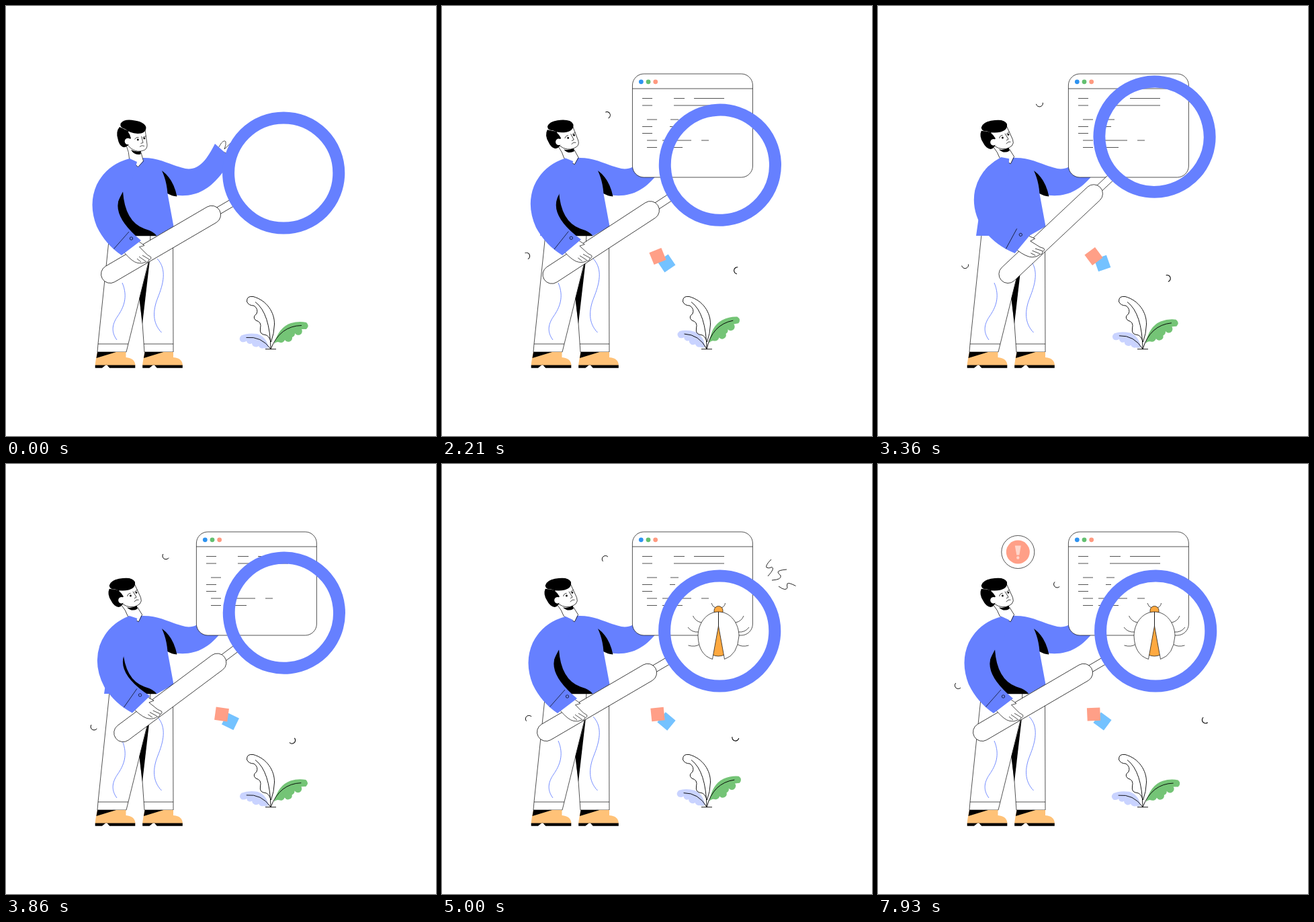
Animation, 640 px wide and 640 px high, one loop 8 s. Source, as an HTML page:

```html
<!DOCTYPE html>
<html lang="en">
<head>
<meta charset="utf-8">
<title>Bug search</title>
<style>
  html, body { margin: 0; width: 100%; height: 100%; overflow: hidden; background: #fff; }
  svg { display: block; width: 100vw; height: 100vh; }
  .o { fill: #fff; stroke: #000; }
  .l { fill: none; stroke: #000; }
  .w { fill: none; stroke: #6680ff; }
  .b { fill: #6680ff; }
  .t { fill: #ffc278; }
</style>
</head>
<body>
<svg viewBox="0 0 640 640" stroke-width=".68" stroke-linejoin="round">
  <defs>
    <g id="shoe">
      <path class="t" d="M136 515H178.500V523Q192 524 192.500 535H132.700Q133 529 136 515Z"/>
      <path d="M136 515H164L134.500 524ZM132.700 534.500H192.300V538.800H154L149.500 533.500 143 538.800H132.700Z"/>
      <path fill="#fff" d="M149.500 534L154.500 539.500H143.500Z"/>
    </g>
  </defs>

  <!-- plant -->
  <g id="blueLeaf">
    <path fill="#c9d3ff" d="M391 508Q387 492 374 488Q360 486 350 490.500Q345 496 350.500 500Q356 501 358 498.500A5 5 0 0 0 366 502A6 6 0 0 0 376 506A6 6 0 0 0 384 509Q388 511 391 508Z"/>
    <path class="l" stroke-width=".9" d="M357.500 493.500Q380 491 394 510.500"/>
  </g>
  <g id="greenLeaf">
    <path fill="#74c476" d="M399 503Q406 478 424 472Q436 468.500 447 471Q452.500 476 447 481L440 481A5.500 5.500 0 0 1 430 487A6 6 0 0 1 426 493A6 6 0 0 1 415 497A6 6 0 0 1 407 500.500Q402 499 399 503Z"/>
    <path class="l" stroke-width=".9" d="M394 510.500Q408 476 440 475.500"/>
  </g>
  <path class="o" stroke-width=".9" d="M368 432.500C388 438 400 456 399.500 474Q399 488 394.500 500Q391 490 386 489.500Q377 489 378.500 480Q381 470 372 468Q366 463 373 458Q376 451 369 446Q361 446 358.500 440Q358 431 368 432.500Z"/>
  <path class="l" stroke-width=".9" d="M371 440.500Q393 457 394 510.500M386 510.700H402"/>

  <!-- legs -->
  <path class="o" d="M154 340L137 503 136 515H179L213 378 225 340Z"/>
  <path class="o" d="M215 340L213 378 199 434 203 472 206 515H249L248.500 340Z"/>
  <path d="M214 376L198.500 436 203 473 214 378Z"/>
  <path class="l" d="M137 503H182M205 503H249"/>
  <path class="w" stroke-width=".9" d="M173 412C182 433 175 449 166 462S157 486 165 497M225 376C240 392 234 414 226 434S218 472 231.500 486"/>
  <use href="#shoe"/><use href="#shoe" x="70.500"/>

  <!-- torso and far arm -->
  <path class="o" d="M315 213L320.500 204Q325 199 327 202Q328 206 325 213L334 204.500V222Z"/>
  <path class="b" d="M181 228.500Q195 224 205 226C230 226 247 238 267 242C287 245 298 230 311 205L330 222V238C308 268 287 290 240.500 279.500L249.500 328V342H146L149 321 160 243Q170 233 181 228.500Z"/>
  <path d="M232 245Q249 257 254.500 283.500Q247 283 240.500 279Q239 260 232 245Z"/>
  <path d="M174 276Q177 321 206 331.500Q220 335.500 224.500 342.300H190Q158 318 167 290Z"/>
  <path fill="#fff" d="M249.800 328L224.500 342.300H250Z"/>

  <g id="head">
    <path fill="#fff" d="M179.500 209L184 228 196.500 239.500 204.500 230 201 216 188 200Z"/>
    <path class="l" d="M179.500 209Q183 217 183.500 227L196.500 239.500 204.500 231 201 218"/>
    <path d="M186 214Q193 218 201 215.500L200.500 220.500Q191 223 186 214Z"/>
    <path class="o" d="M182 184H207L210 206Q210.500 212 206 214.500Q196 219 186 212L180 206Z"/>
    <path d="M169 180Q163 187 166.500 198Q168 207 174 210Q179 211 183 206L181 200 186 197 184 191Q181 187 182 186Z"/>
    <path d="M170.500 175Q175 168.500 187 169.800Q207 172 208.500 181Q208 190 196 190Q184 189 177 183Q169 181 170.500 175Z"/>
    <circle cx="181.500" cy="201.500" r="4.800" fill="#fff"/>
    <circle cx="196.300" cy="199" r="1.450"/><circle cx="205.800" cy="197" r="1.450"/>
    <path class="l" d="M191.500 198.500Q193.500 194.500 197.500 195.500M203.500 195.500L208.500 193.500M201.500 194L204 203.500 200.500 204.500M199 209.500Q202 206.500 206 208.500"/>
  </g>

  <!-- browser window -->
  <g id="win">
    <rect class="o" x="283.400" y="101" width="179" height="154" rx="17"/>
    <path class="l" d="M283.400 123H462.400"/>
    <circle cx="296.300" cy="112.800" r="3.400" fill="#2e93f0"/>
    <circle cx="307" cy="112.800" r="3.400" fill="#63c070"/>
    <circle cx="317.700" cy="112.800" r="3.400" fill="#ff9a80"/>
    <path id="code" class="l" d="M298 137.500h15m32 0h16m14 0h45M298 148h15m32 0h75M305 169h15m20 0h12M298 179.500h15m26 0h8M298 189.500h15M305 200h15m8 0h43m15 0h11M305 210.500h15m8 0h30"/>
  </g>

  <!-- floating bits -->
  <rect id="sky" x="-9.700" y="-9.700" width="19.400" height="19.400" fill="#74c2ff"/>
  <rect id="coral" x="-9.700" y="-9.700" width="19.400" height="19.400" fill="#ff9f87"/>
  <g class="l" stroke-width=".9">
    <path id="arcTop" d="M.5 -5A5 5 0 0 1 .5 5"/>
    <path id="arcLeft" d="M.5 -5A5 5 0 0 1 .5 5"/>
    <path id="arcRight" stroke-width="1.100" d="M.5 -5A5 5 0 0 1 .5 5"/>
  </g>
  <g id="zaps" class="l" stroke-width=".85">
    <path pathLength="1" d="M490 142Q481 151 483 154Q486 156 491 153.500Q496 155 485 167"/>
    <path pathLength="1" d="M513 157Q500 158 500 161Q501 164 504 166Q506 172 491 173"/>
    <path pathLength="1" d="M526.500 181.500Q516 176 514 178Q513 181 514 184Q512 190 501 182"/>
  </g>
  <g id="badge">
    <circle class="o" r="24.500"/>
    <circle r="17.500" fill="#ff9f87"/>
    <g id="mark" fill="#fff"><path d="M-4.500 -9.500H4.500L2 4.500H-2Z"/><circle cy="8.500" r="2.200"/></g>
  </g>

  <g id="bug">
    <path class="l" d="M407 214Q402 212 401 207M416 214Q421 212 421.500 207M386 236Q377 234 373.500 226M382 250Q372 251 366 243M384 268Q377 273 366.500 270M437 236Q446 234 449 226M441 250Q451 251 457 243M439 268Q446 273 456.500 270"/>
    <path fill="#ffa940" stroke="#000" d="M405 221V218A6.500 6.500 0 0 1 418 218V221Z"/>
    <path fill="#ffa940" stroke="#000" d="M411.500 238L402.500 284Q411 288 420.500 284Z"/>
    <path class="o" d="M411.500 220C393 220 381 238 381 256Q382 284 402.500 290.500L411.500 241ZM411.500 220C430 220 442 238 442 256Q440 284 420.500 290.500L411.500 241Z"/>
  </g>

  <!-- near arm holding the glass -->
  <g id="arm">
    <g transform="translate(155 399) rotate(-30.300)">
      <rect class="o" x="180" y="-5.500" width="32" height="11"/>
      <rect class="o" x="-13.500" y="-13.500" width="202" height="27" rx="13.500"/>
    </g>
    <circle cx="413.200" cy="248.500" r="82.100" fill="none" stroke="#6680ff" stroke-width="18"/>
    <path class="o" d="M176 367Q188 381 196 382.500Q203 384 208 381Q212 382 212.500 378Q217 377 215.500 373.500Q210 371 206 366L198.500 358.500 206 356.500 193 347Z"/>
    <path class="l" d="M195 376L201 381M198 373L208 380M203 371L213 377"/>
    <path class="b" d="M184 227Q150 236 135 266Q122 295 135 328Q148 355 172 371L201 349 193 342Q158 310 169 285L174 276 186 265 195 232Z"/>
    <path class="l" d="M160.500 361.500L183 336"/>
    <circle class="l" cx="186.500" cy="346" r="2.200"/>
  </g>
</svg>
<script>
const TURN = 4.17; // when the small arcs change direction

const $ = id => document.getElementById(id);
const move = (id, value) => $(id).setAttribute('transform', value);
const ramp = (t, a, b) => Math.min(1, Math.max(0, (t - a) / (b - a)));
const ease = (t, a, b) => { const p = ramp(t, a, b); return p * p * (3 - 2 * p); };
const easeOut = (t, a, b) => 1 - (1 - ramp(t, a, b)) ** 3;

// start -> middle -> end, straight on both sides of the turn
const drift = (t, start, middle, end) =>
  start + (middle - start) * ramp(t, 0, TURN) + (end - middle) * ramp(t, TURN, 8);

function draw(t) {
  const lift = 12.9 * (ease(t, 1.75, 3.27) - ease(t, 3.43, 4.29));
  move('arm', `rotate(${-lift} 174.5 229)`);
  move('head', `rotate(${-17 * ease(t, 1.75, 2.4)} 181 234)`);

  move('win', `translate(${362 * (1 - ease(t, 0, .86)) + .8 * (1 - ease(t, 1.8, 2.3))})`);
  $('code').setAttribute('stroke-dasharray', `${80 * ease(t, 1.35, 2.4)} 100`);
  $('code').setAttribute('visibility', t > 1.35 ? 'visible' : 'hidden');

  const sway = 10 * Math.sin(Math.PI * (t % 4) / 4);
  move('greenLeaf', `rotate(${-sway} 394 510.5)`);
  move('blueLeaf', `rotate(${sway * .9} 394 510.5)`);

  const pop = easeOut(t, .1, .6);
  const place = (id, x, y, angle) => move(id, `translate(${x} ${y}) rotate(${angle}) scale(${pop})`);
  const spin = 91 * (t - 2.86);
  place('coral', 321, 372.5, 9 - spin);
  place('sky', 334, 383, 25 + spin);
  place('arcTop', drift(t, 254, 237, 267.5), drift(t, 198, 131.5, 179.5), 33 + spin);
  place('arcLeft', drift(t, 117, 132.5, 119.5), drift(t, 348, 394, 328), 33 + spin);
  place('arcRight', drift(t, 460, 422.5, 489), drift(t, 371, 414, 380), drift(t, -108, 450, 500));

  move('bug', `translate(411.5 250) scale(${easeOut(t, 4.3, 4.75)}) translate(-411.5 -250)`);
  const p = t > 4.7 && t < 7.7 ? (t - 4.7) % 1 : 0;
  const tail = ease(p, .4, .7), length = ease(p, 0, .28) - tail;
  for (const zap of $('zaps').children) {
    zap.setAttribute('stroke-dasharray', `0 ${tail} ${length} 2`);
    zap.setAttribute('visibility', length > 0 ? 'visible' : 'hidden');
  }

  move('badge', `translate(208.3 131) scale(${easeOut(t, 5.01, 5.3)})`);
  $('mark').setAttribute('opacity', .7 + .15 * Math.cos(2 * Math.PI * (t - 6.5)));
}

function frame() {
  draw(performance.now() % 8000 / 1000);
  requestAnimationFrame(frame);
}
frame();
</script>
</body>
</html>
```
